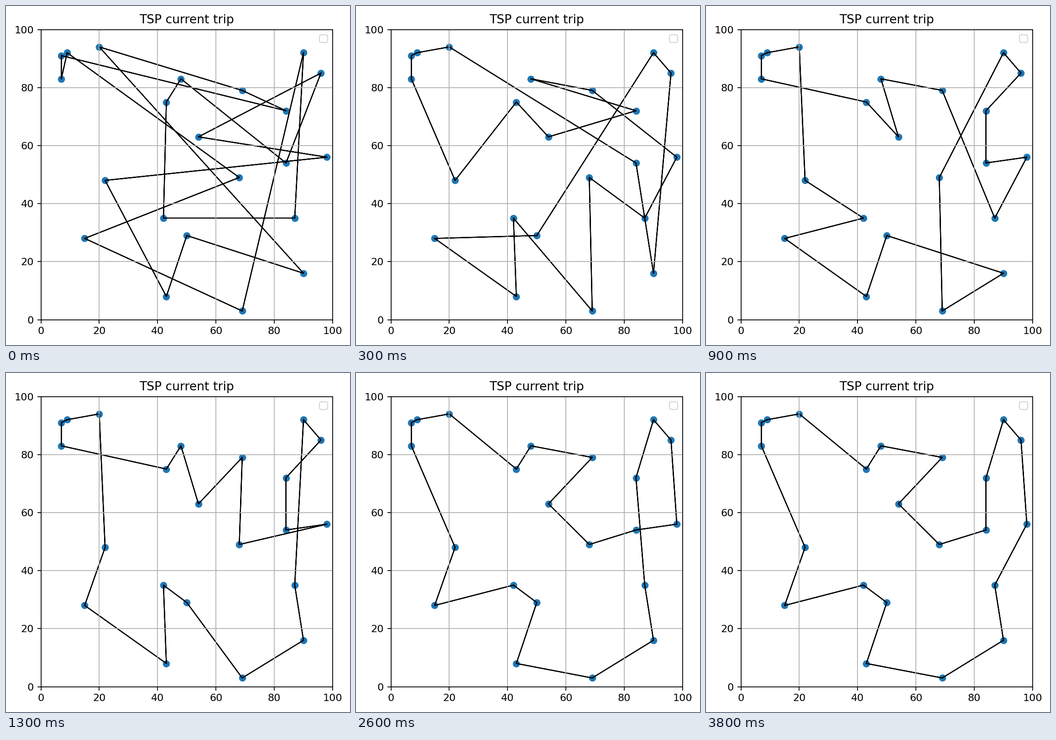
Animation of 754x743 px, one loop 6600 ms. Source, as a matplotlib script:

```python
import math

import matplotlib.pyplot as plt
from matplotlib.animation import FuncAnimation

WIDTH, HEIGHT, DPI = 754, 743, 160
LEFT, RIGHT, TOP, BOTTOM = 76.5, 716, 51.5, 687.5
FRAMES, INTERVAL = 66, 100

CITIES = dict(
    A=(7, 91), B=(7, 83), C=(9, 92), D=(20, 94), E=(48, 83), F=(43, 75),
    G=(69, 79), H=(84, 72), I=(54, 63), J=(90, 92), K=(96, 85), L=(98, 56),
    M=(84, 54), N=(68, 49), O=(22, 48), P=(42, 35), Q=(87, 35), R=(15, 28),
    S=(50, 29), T=(43, 8), U=(69, 3), V=(90, 16),
)

START = "DGHABCNRUJQPFEMKILOTSV"
# Tours reached after a run of updates, with the frames of those updates.
SEARCH = [
    ("DCABOFIHEGLQNUPTRSJKVM", (1, 2, 3)),
    ("DCABFIEGQLMHKJNUVSTRPO", (4, 5, 6, 7, 9)),
    ("DCABFEIGNLMHKJQVUSPTRO", (10, 11, 12, 13)),
    ("BCADEFIGNMLHKJQVUTSPRO", (14, 15)),
]
# Late refinements: two cities trade places in the tour.
REFINE = {19: "AC", 21: "JK", 23: "GI", 25: "EF", 26: "HK", 36: "HL", 38: "JK"}


def legs(tour):
    return zip(tour, tour[1:] + tour[:1])


def length(tour):
    return sum(math.dist(CITIES[a], CITIES[b]) for a, b in legs(tour))


def swap(tour, a, b):
    return tour.translate(str.maketrans(a + b, b + a))


def swaps_toward(tour, goal):
    """Tours from one to another, taking the shortest helpful swap each time."""
    path = [tour]
    while tour != goal:
        options = [swap(tour, a, b) for a, b in zip(tour, goal) if a != b]
        tour = min(options, key=length)
        path.append(tour)
    return path


def build_updates():
    updates = {0: START}
    tour = START
    for goal, frames in SEARCH:
        path = swaps_toward(tour, goal)
        for k, frame in enumerate(frames, 1):
            updates[frame] = path[round(k * (len(path) - 1) / len(frames))]
        tour = goal
    for frame, pair in REFINE.items():
        tour = updates[frame] = swap(tour, *pair)
    return updates


UPDATES = build_updates()

fig = plt.figure(figsize=(WIDTH / DPI, HEIGHT / DPI), dpi=DPI)
ax = fig.add_axes([LEFT / WIDTH, 1 - BOTTOM / HEIGHT,
                   (RIGHT - LEFT) / WIDTH, (BOTTOM - TOP) / HEIGHT])
ax.scatter(*zip(*CITIES.values()))
arrows = [ax.arrow(0, 0, 1, 1, width=0.001, ec="black", fc="black")
          for _ in CITIES]
ax.set(xlim=(0, 100), ylim=(0, 100), title="TSP current trip")
ax.grid(True)
ax.legend([], [], loc="upper right")


def draw(frame):
    tour = UPDATES[max(f for f in UPDATES if f <= frame)]
    for arrow, (a, b) in zip(arrows, legs(tour)):
        (x0, y0), (x1, y1) = CITIES[a], CITIES[b]
        arrow.set_data(x=x0, y=y0, dx=x1 - x0, dy=y1 - y0)
    return arrows


anim = FuncAnimation(fig, draw, frames=FRAMES, interval=INTERVAL,
                     repeat=True, repeat_delay=0)
plt.show()
```
